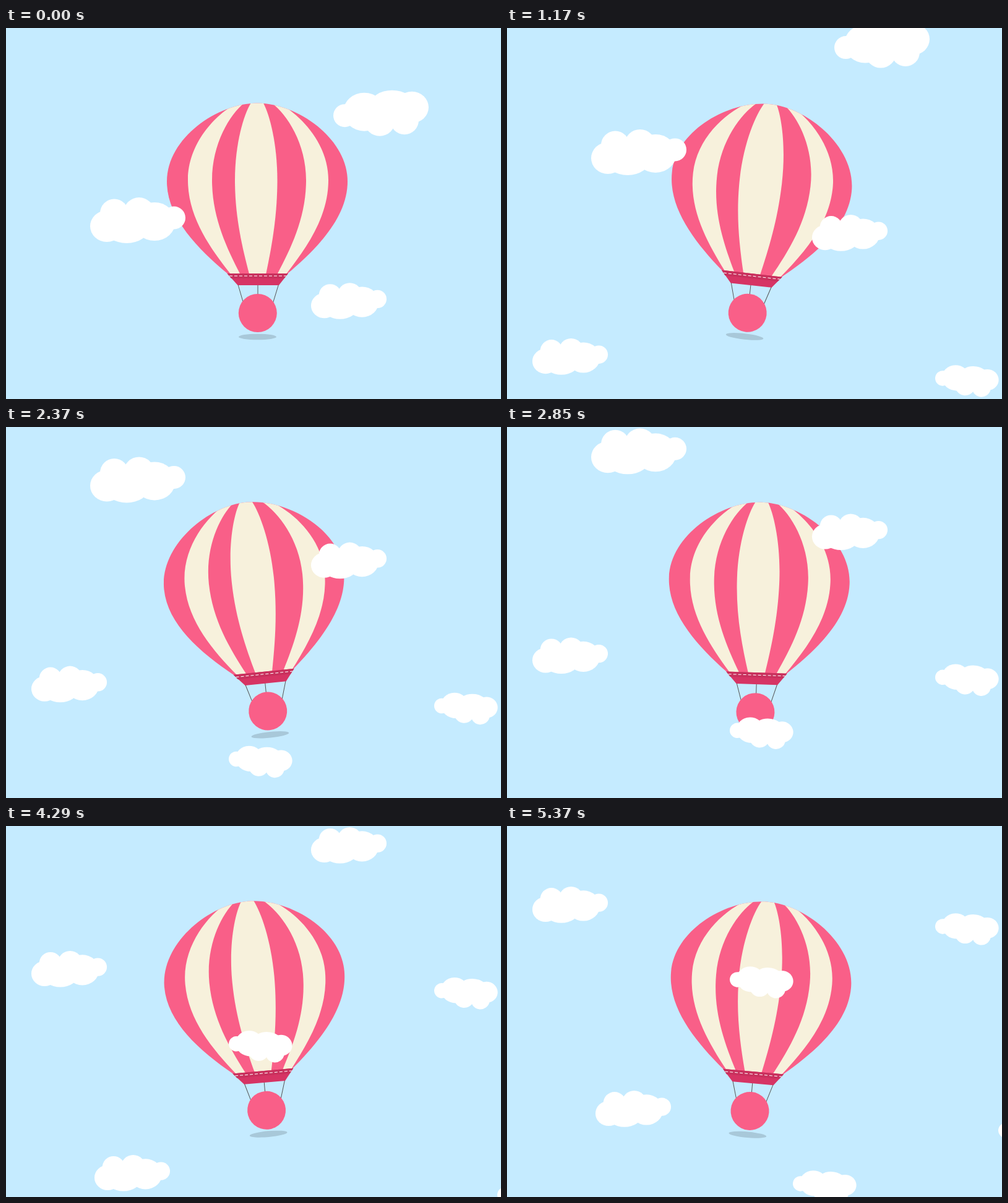
An HTML page for the animation above (5400 ms loop, 800 by 600 pixels).

```html
<!DOCTYPE html>
<html lang="en">
<head>
<meta charset="utf-8">
<title>Balloon ride</title>
<style>
  html, body { margin: 0; width: 100%; height: 100%; overflow: hidden; background: #c5ebff; }
  svg { display: block; width: 100vw; height: 100vh; }
</style>
</head>
<body>
<svg viewBox="0 0 800 600">
  <defs>
    <clipPath id="skin">
      <path id="hull" d="M406 121.5C470 121.5 552 178 552 248C552 305 505 355 454 398H359C307 355 260 305 260 248C260 178 342 121.5 406 121.5Z"/>
    </clipPath>
    <g id="cloud" fill="#fff">
      <ellipse cx="-50" cy="9.500" rx="27" ry="25.500"/>
      <circle cx="-38" cy="-11.500" r="23"/>
      <circle cx="2" cy="-12" r="25"/>
      <ellipse cx="27" cy="2" rx="34" ry="31"/>
      <circle cx="58.500" cy="-4" r="18.500"/>
      <ellipse cx="-18" cy="12" rx="36" ry="25"/>
    </g>
  </defs>
  <rect width="800" height="600" fill="#c5ebff"/>
  <g id="balloon">
    <ellipse cx="406.500" cy="499.500" rx="30.500" ry="4.800" fill="#a8c8d9"/>
    <path d="M375 415L384 446M407 415V432M440.500 415L431 446" stroke="#555" fill="none"/>
    <circle cx="406.800" cy="461" r="31" fill="#f95f88"/>
    <use href="#hull" fill="#f95f88"/>
    <g id="stripes" clip-path="url(#skin)" fill="#f7f1dc"/>
    <path d="M357.500 397H456L441 416H374.500Z" fill="#d63464"/>
    <path d="M357.500 397H456L449.500 405H364Z" fill="#c9305d"/>
    <path d="M361 401H453" stroke="#fff" stroke-dasharray="5 3"/>
  </g>
  <g id="sky"></g>
</svg>
<script>
const LOOP = 5400, LEG = 1160;
const $ = id => document.getElementById(id);

const svgEl = (name, attrs, parent) => {
  const el = document.createElementNS('http://www.w3.org/2000/svg', name);
  for (const key in attrs) el.setAttribute(key, attrs[key]);
  return parent.appendChild(el);
};

// A seam narrows towards both ends in proportion to its widest place.
function seam(x) {
  const top = 406.5 + (x - 406.5) * .29;
  const foot = 407.5 + (x - 406.5) * .395;
  return [
    [top, 121], [top + (x - top) * .45, 140], [x, 187], [x, 246],
    [x, 305], [x + (foot - x) * .5, 354], [foot, 398]
  ];
}
function stripe(left, right) {
  const [a, ...down] = seam(left);
  const [b, ...up] = seam(right).reverse();
  svgEl('path', { d: `M${a}C${down.join(' ')}L${b}C${up.join(' ')}Z` }, $('stripes'));
}
stripe(294, 333);
stripe(370, 438.5);
stripe(485, 521);

function cloud(x, y, size = 1, turn = 0) {
  svgEl('use', {
    href: '#cloud',
    transform: `translate(${x} ${y}) rotate(${turn}) scale(${size})`
  }, $('sky'));
}
const MID = .793, SMALL = .663, TURN = 189;
cloud(213, 311);
cloud(606, 137.7, 1, 180);
cloud(554, 441.5, MID);
// The lower clouds come in two equal groups, the second shifted.
for (let i = 0; i < 2; i++) {
  const dx = i * 102, dy = i * 330;
  cloud(102 + dx, 641.5 + dy, MID);
  cloud(743 + dx, 680 + dy, SMALL, TURN);
  cloud(411 + dx, 766 + dy, SMALL, TURN);
}

// Swings right and left, quick at first and then settling.
const RIGHT = 6.45, LEFT = -5.95, FIRST = 1523;
function tilt(t) {
  if (t < FIRST) {
    const p = Math.min(1, Math.max(0, (t - 26) / 1124));
    return RIGHT * (1 - Math.cos(Math.PI * p)) / 2;
  }
  const leg = Math.floor((t - FIRST) / LEG);
  const p = 1 - 2 ** (-10 * ((t - FIRST) / LEG - leg));
  const [from, to] = leg % 2 ? [LEFT, RIGHT] : [RIGHT, LEFT];
  return from + (to - from) * p;
}

const start = performance.now();
function draw() {
  const t = Math.max(0, performance.now() - start) % LOOP;
  const rise = .0962 * Math.max(0, t - 26.5);
  $('sky').setAttribute('transform', `translate(0 ${-rise})`);
  $('balloon').setAttribute('transform', `rotate(${tilt(t)} 400 300)`);
  requestAnimationFrame(draw);
}
draw();
</script>
</body>
</html>
```
